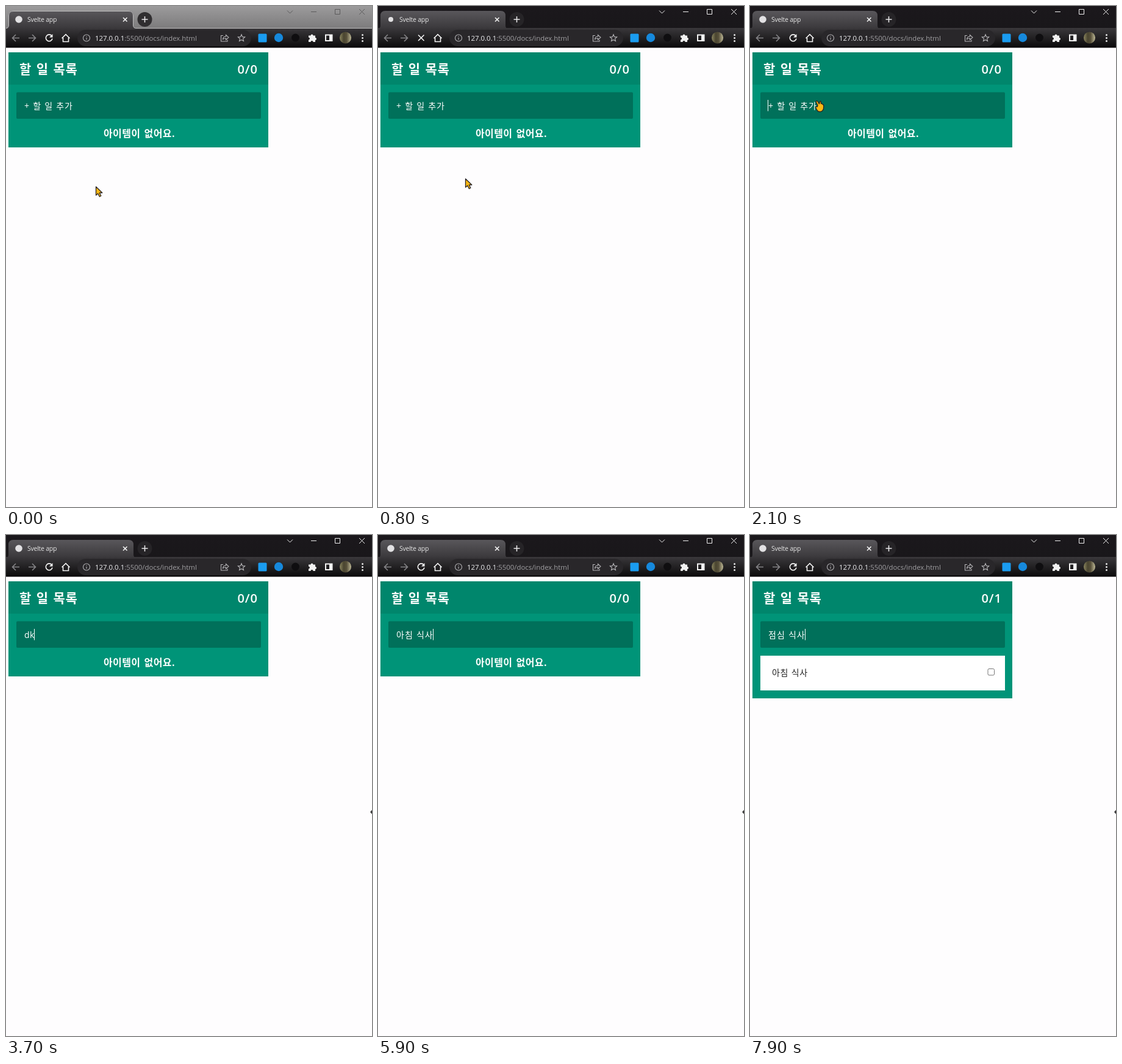
An HTML page for the animation above (8000 ms loop, 600x822 px).

```html
<!DOCTYPE html>
<html lang="ko">
<head>
<meta charset="utf-8">
<title>할 일 목록</title>
<style>
  html, body { margin: 0; width: 100%; height: 100%; overflow: hidden; background: #fefdfe; }
  svg { display: block; }
  text { font-family: "Open Sans", "Noto Sans CJK KR", "Noto Sans CJK", sans-serif; white-space: pre; }
  .small { font-size: 14px; font-weight: 500; letter-spacing: 1px; word-spacing: .5px; }
  .line { fill: none; stroke: #e6e5e7; stroke-width: 1.6; }
  .thin { fill: none; stroke: #b5b4b7; stroke-width: 1.1; }
  .dim { stroke: #858487; }
  .white { stroke: #f4f4f4; }
  .pointer { fill: #fcb813; stroke: #2b2525; stroke-width: 1.3; stroke-linejoin: round; }
</style>
</head>
<body>
<svg width="600" height="822" viewBox="0 0 600 822">
  <defs>
    <linearGradient id="idleBar" x2="0" y2="1">
      <stop stop-color="#9c9b9c"/><stop offset="1" stop-color="#7c7b7c"/>
    </linearGradient>
    <linearGradient id="liveBar" x2="0" y2="1">
      <stop stop-color="#1b181c"/><stop offset="1" stop-color="#19171a"/>
    </linearGradient>
    <linearGradient id="tabFill" x2="0" y2="1">
      <stop stop-color="#59575b"/><stop offset="1" stop-color="#3a383b"/>
    </linearGradient>
    <linearGradient id="toolFill" x2="0" y2="1">
      <stop stop-color="#3a383b"/><stop offset="1" stop-color="#0b0a0b"/>
    </linearGradient>
    <linearGradient id="photo">
      <stop stop-color="#8b865f"/><stop offset=".35" stop-color="#4a4530"/>
      <stop offset=".6" stop-color="#57503a"/><stop offset="1" stop-color="#c0bb98"/>
    </linearGradient>
  </defs>

  <rect width="600" height="822" fill="#fefdfe"/>

  <!-- title bar -->
  <rect id="bar" width="600" height="37"/>
  <path d="M0 37Q4 37 4 32V16Q4 8 12 8H201Q209 8 209 16V32Q209 37 213 37Z" fill="url(#tabFill)"/>
  <circle id="icon" cx="21" cy="22" fill="#e2e1e3"/>
  <text x="35" y="26" font-size="10.5" letter-spacing="-.25" fill="#e6e6e6">Svelte app</text>
  <path class="line white" d="M192 19l6.5 6.5m0-6.5l-6.5 6.5"/>
  <circle id="plusDisc" cx="227.500" cy="22" r="12"/>
  <path class="line" d="M222.500 22h10m-5-5v10"/>
  <g id="controls" fill="none">
    <path d="M461 7.500l4.500 4.500 4.500-4.500M500 9.500h9M539.500 5.500h8v8h-8zM579 5l9 9m0-9l-9 9"/>
  </g>

  <!-- toolbar -->
  <rect y="36" width="600" height="32.500" fill="url(#toolFill)"/>
  <path id="outline" d="M0 36.500Q4 36.500 4.500 32V16Q4.500 8.500 12 8.500H201Q208.500 8.500 208.500 16V32Q209 36.500 213 36.500H600" fill="none" stroke="#bdbcbd"/>
  <rect x="117" y="39" width="285" height="27" rx="13.500" fill="#29272a"/>
  <path class="line dim" d="M22 52.500H10.500m5.500-5.500l-5.500 5.500 5.500 5.500M37 52.500h11.500m-5.500-5.500l5.500 5.500-5.500 5.500"/>
  <g id="reload">
    <path class="line white" d="M75 49A5.400 5.400 0 1 0 76 53.500"/>
    <path d="M76.500 46v5.500H71z" fill="#f4f4f4"/>
  </g>
  <path id="stop" class="line white" d="M66 47.500l9.500 9.500m0-9.500l-9.500 9.500"/>
  <path class="line white" d="M91.500 53l6.500-6.300 6.500 6.300M93.500 52v6.500h9V52"/>
  <circle class="thin" cx="132" cy="52.500" r="5.500"/>
  <path class="thin" d="M132 52v3.500m0-6v1.200"/>
  <text x="146" y="57" font-size="11.400" fill="#a09fa2"><tspan fill="#eeeef0">127.0.0.1</tspan>:5500/docs/index.html</text>
  <path class="thin" d="M356 48.500h-3.500V58h10.500v-2.500M355.500 54.500q.5-4.500 5-4.500v-2.500l4.500 4-4.500 4V53q-3 0-5 1.500z"/>
  <path id="star" class="thin"/>
  <rect x="413.500" y="45.500" width="14" height="14" rx="1.500" fill="#1a9cf0"/>
  <circle cx="447" cy="52" r="7.200" fill="#1689dc"/>
  <circle cx="474.500" cy="52" r="6.500" fill="#0f0e10"/>
  <path d="M496 48.500h3.500a2 2 0 1 1 4 0h3.500v3.500a2 2 0 1 1 0 4v3h-3.500a2 2 0 0 0-4 0H496V55.500a2 2 0 0 0 0-4z" fill="#f2f2f2"/>
  <path d="M523 46.500h12.500V58H523zM525 48.500V56h5v-7.500z" fill="#f2f2f2" fill-rule="evenodd"/>
  <circle cx="556.500" cy="52" r="9.500" fill="url(#photo)"/>
  <g fill="#e6e6e6"><circle cx="584.500" cy="47.500" r="1.500"/><circle cx="584.500" cy="52.500" r="1.500"/><circle cx="584.500" cy="57.500" r="1.500"/></g>

  <!-- to-do card -->
  <rect id="card" x="4" y="76" width="426" fill="#009478"/>
  <rect x="4" y="76" width="426" height="53" fill="#00866c"/>
  <text x="22" y="111" font-size="21" font-weight="700" letter-spacing=".7" word-spacing="1.600" fill="#fff">할 일 목록</text>
  <text id="count" x="379.500" y="111" font-size="20" font-weight="600" letter-spacing=".9" fill="#fff"></text>
  <rect x="17" y="141.500" width="401" height="43.500" rx="2" fill="#00705a"/>
  <text id="entry" class="small" x="30" y="169" fill="#fff"></text>
  <rect id="underline" y="171" height="1" fill="#fff"/>
  <rect id="caret" y="154" width="1" height="18.500" fill="#fff"/>
  <text id="empty" x="160" y="215" font-size="16" font-weight="700" letter-spacing=".4" word-spacing="1.500" fill="#fff">아이템이 없어요.</text>
  <g id="item">
    <rect x="17" y="198" width="401" height="57" fill="#fff"/>
    <text class="small" x="36" y="230.500" fill="#222" style="letter-spacing:.6px">아침 식사</text>
    <rect x="390" y="219.500" width="10.500" height="10.500" rx="2" fill="#fff" stroke="#767676"/>
  </g>

  <!-- pointers -->
  <path id="arrow" class="pointer" d="M.500.500V14.500L3.700 11.700 6.300 16.800 8.800 15.500 6.300 10.500H10.800Z"/>
  <path id="hand" class="pointer" d="M1 1.700Q2.700-.2 4.200 1.800L6.400 5.600Q8-.600 9.300 1.700L9.500 5.500Q11.300 4 12 6.500 13.800 6.500 13.800 9L13.500 13.500Q12 18.500 7.500 18.500 4 18.500 2.800 15.500L.600 11.500Q.700 9.500 3.200 10.500L4 8Z"/>
  <path id="edge" d="M597 454.500l3-3.500v7z" fill="#333"/>
</svg>
<script>
  const LOOP = 8000, STEP = 100;
  const HINT = '+ 할 일 추가';
  const $ = id => document.getElementById(id);
  const show = (id, on) => $(id).style.display = on ? '' : 'none';
  const set = (id, attrs) => { for (const k in attrs) $(id).setAttribute(k, attrs[k]); };

  // [time, text, is the last letter still being composed]
  const typing = [
    [0, ''], [3500, 'd'], [3700, 'dk'], [3900, 'dkc'], [4100, 'dk'], [4300, 'd'], [4400, ''],
    [4700, 'ㅇ', 1], [4900, '아', 1], [5000, '앛', 1], [5100, '아치', 1], [5200, '아침', 1],
    [5300, '아침 '], [5400, '아침 ㅅ', 1], [5500, '아침 시', 1], [5600, '아침 식', 1],
    [5700, '아침 싟', 1], [5800, '아침 식사', 1], [5900, '아침 식사'], [6000, ''],
    [6300, '저', 1], [6500, '점', 1], [6800, '점ㅅ', 1], [6900, '점시', 1], [7000, '점심', 1],
    [7200, '점심 '], [7300, '점심 ㅅ', 1], [7400, '점심 시', 1], [7500, '점심 식', 1],
    [7600, '점심 싟', 1], [7700, '점심 식사', 1], [7900, '점심 식사']
  ];

  // [time, x, y]
  const path = [
    [0, 147, 296], [800, 143, 283], [1100, 142, 296], [1400, 137, 300], [1500, 134, 288],
    [1600, 126, 255], [1700, 117, 221], [1800, 109, 192], [1900, 108, 175],
    [2000, 107, 160], [2100, 107, 155], [2300, 107, 155], [2400, 125, 170],
    [2500, 265, 260], [2600, 460, 380], [2700, 598, 446]
  ];

  const within = (t, a, b) => t >= a && t < b;

  function pointerAt(t) {
    const i = path.findIndex(p => p[0] > t);
    if (i < 0) return path[path.length - 1].slice(1);
    const [a, b] = [path[i - 1], path[i]];
    const k = (t - a[0]) / (b[0] - a[0]);
    return [1, 2].map(n => a[n] + (b[n] - a[n]) * k);
  }

  function drawWindow(t) {
    const live = t >= 300, loading = within(t, 600, 1000);
    set('bar', { fill: live ? 'url(#liveBar)' : 'url(#idleBar)' });
    set('plusDisc', { fill: live ? '#262427' : '#302e30' });
    set('controls', { stroke: live ? '#f2f2f2' : '#5b5a5b' });
    set('icon', { r: within(t, 600, 1200) ? 4 : 5.8 });
    show('outline', !live);
    show('reload', !loading);
    show('stop', loading);
  }

  function drawEntry(t) {
    const [, text, composing] = typing.filter(s => s[0] <= t).pop();
    const entry = $('entry');
    const measure = s => {
      entry.textContent = s;
      return s ? entry.getComputedTextLength() : 0;
    };
    entry.style.letterSpacing = /[a-z]/.test(text) ? '.3px' : '';
    const start = 30 + measure(text.slice(0, -1));
    const end = 30 + measure(text);
    entry.textContent = text || HINT;
    set('underline', { x: start, width: Math.max(0, end - start - 1) });
    show('underline', composing);
    set('caret', { x: Math.round(end - .8) });
    show('caret', t >= 2100 && !within(t, 2600, 3200));
  }

  function drawCard(t) {
    const added = t >= 6000;
    set('card', { height: added ? 192 : 156 });
    $('count').textContent = added ? '0/1' : '0/0';
    show('empty', !added);
    show('item', added);
  }

  function drawPointer(t) {
    const [x, y] = pointerAt(t);
    const over = within(t, 1900, 2500), gone = t >= 2700;
    for (const id of ['arrow', 'hand']) set(id, { transform: `translate(${x} ${y})` });
    show('arrow', !over && !gone);
    show('hand', over);
    show('edge', gone);
  }

  const points = Array.from({ length: 10 }, (_, i) => {
    const a = Math.PI * (i / 5 - .5), r = i % 2 ? 2.7 : 6;
    return `${386 + r * Math.cos(a)} ${52.8 + r * Math.sin(a)}`;
  });
  set('star', { d: `M${points.join('L')}Z` });

  const origin = performance.now();
  let last = -1;
  function frame() {
    const now = Math.max(0, performance.now() - origin) % LOOP;
    const t = Math.floor(now / STEP) * STEP;
    if (t !== last) {
      last = t;
      [drawWindow, drawEntry, drawCard, drawPointer].forEach(draw => draw(t));
    }
    requestAnimationFrame(frame);
  }
  frame();
</script>
</body>
</html>
```
